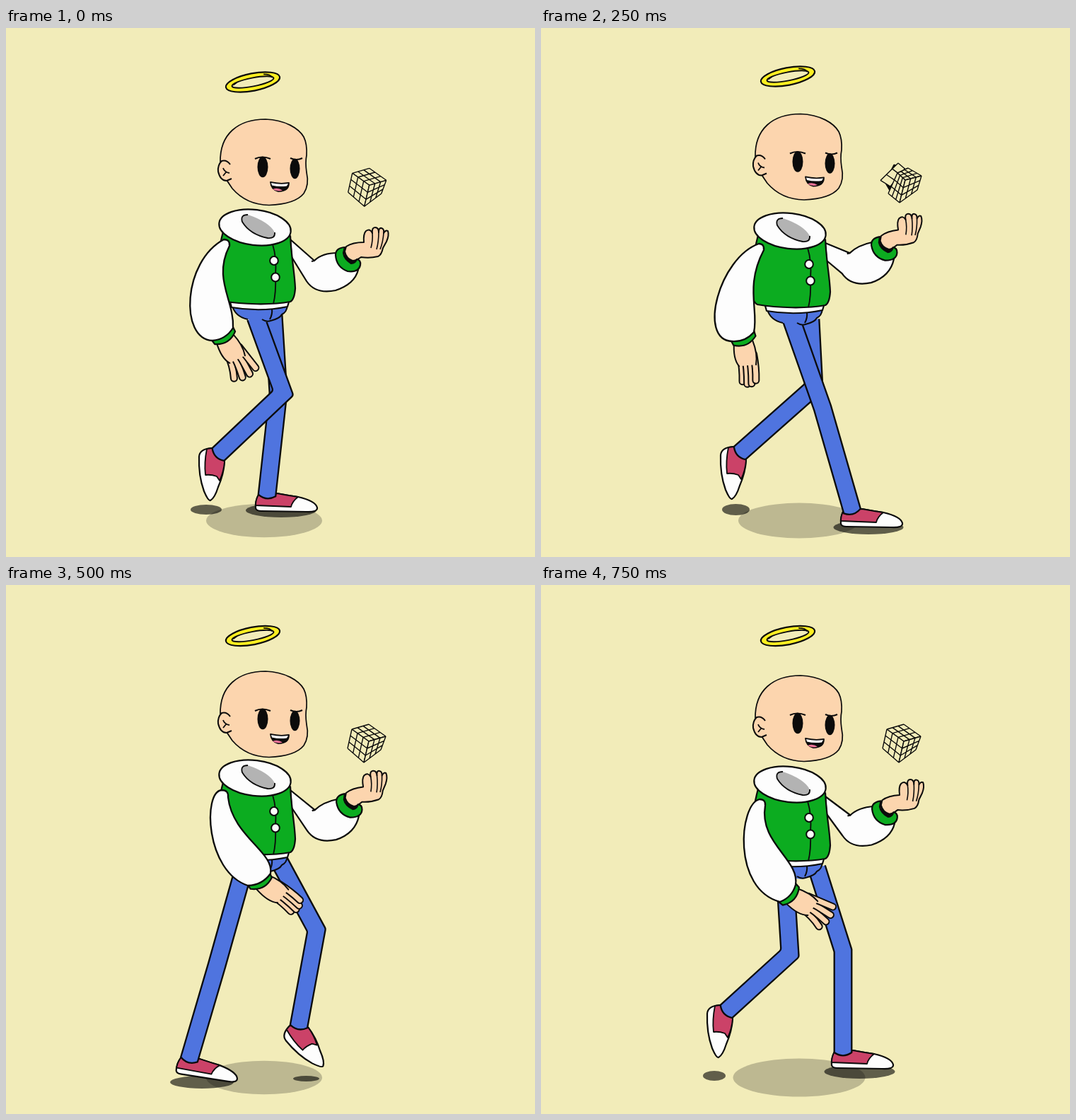
These frames come from a looping animation (748x748 px, 0.83 s). An HTML page with a canvas:

```html
<!DOCTYPE html>
<html lang="en">
<head>
<meta charset="utf-8">
<title>Walk cycle</title>
<style>
html, body { margin: 0; height: 100%; overflow: hidden; background: #f2ecb9; }
canvas { display: block; }
</style>
</head>
<body>
<canvas width="748" height="748"></canvas>
<script>
const c = document.querySelector('canvas').getContext('2d');
const INK = '#0b0b0b', SKIN = '#fcd5ae', GREEN = '#0cac20', BLUE = '#4f74df',
  RED = '#cb4268', WHITE = '#fdfdfd', YELLOW = '#fdee21', PAPER = '#f2ecb9';

const LOOP = 830;
const starts = [0, 80, 160, 250, 330, 410, 500, 580, 660, 750];
// Ten steps over seven key poses. The second half of the walk mirrors the first,
// so steps 1, 4 and 7 reuse a pose with the legs swapped; the near arm is blended.
const poseAt = [0, 4, 1, 2, 6, 3, 4, 1, 5, 6];
const armAt = [0, .5, 1, 2, 2.5, 3, 4, 4.5, 5, 6];

// Heights of halo, head, body; far hand x, y, turn
const body = [
  [0, 0, 0, 0, 0, 0], [-8, -10, -9, 2.5, -20, -9], [-8, -7.5, 5, 1, -15.5, -6],
  [.5, -1, 1, 0, 0, 0], [-4.5, -7, -9, 1, -15.5, -6], [-7.5, -8, 0, 2.5, -14, -7.5],
  [-4.5, -1, 0, 2, -5, -3]
];
// Hip, knee, ankle of the near leg, then of the far leg
const legs = [
  [353, 409, 392, 516, 300, 603, 378, 405, 385, 516, 369, 661],
  [349, 399, 398, 528, 452, 666, 376, 400, 379, 510, 284, 632],
  [354, 412, 398, 537, 440, 683, 381, 412, 386, 508, 281, 601],
  [346, 422, 350, 538, 335, 681, 389, 400, 429, 498, 350, 603],
  [335, 406, 298, 538, 259, 671, 386, 390, 439, 488, 414, 624],
  [346, 425, 350, 524, 246, 619, 388, 400, 447, 542, 477, 661],
  [346, 425, 352, 521, 262, 603, 390, 400, 427, 517, 427, 661]
];
// Shoe kind and turn: near, far
const feet = [
  ['lift', 0, 'flat', 0], ['strike', 0, 'lift', -36], ['flat', 0, 'lift', 0],
  ['flat', 0, 'lift', 0], ['flat', 8, 'lift', -41], ['lift', 0, 'flat', 0],
  ['lift', 0, 'flat', 0]
];
// Ground shadow width; near x, y, rx, ry; far x, y, rx, ry
const shadows = [
  [82, 283, 681, 22, 7, 389, 682, 50, 10], [75, 461, 709, 31, 7, 288, 681, 30, 10],
  [86, 463, 706, 49.5, 10, 275.5, 681, 19.5, 8], [90, 357, 705, 48, 8, 345, 690, 0, 0],
  [82, 277, 703, 45, 9, 424.5, 698, 18.5, 4], [87, 237, 694, 22, 8, 501, 692, 46, 8],
  [93.5, 245, 694, 16, 7, 450.5, 688, 50, 10]
];
// Near sleeve: outer curve from shoulder to wrist, inner curve back up
const sleeves = [
  [308, 299, 250, 330, 245, 440, 292, 442, 321, 424, 323, 385, 292, 355, 316, 308],
  [308, 290, 250, 310, 218, 425, 266, 427, 298, 414, 305, 390, 290, 350, 316, 300],
  [308, 305, 252, 325, 221, 441, 270, 443, 301, 430, 308, 400, 288, 365, 315, 314],
  [305, 295, 276, 300, 285, 405, 335, 433, 366, 417, 376, 385, 322, 366, 316, 305],
  [305, 290, 278, 292, 282, 405, 342, 425, 374, 408, 380, 378, 320, 355, 314, 300],
  [308, 307, 281, 312, 275, 420, 358, 438, 376, 408, 374, 380, 318, 372, 318, 316],
  [309, 303, 280, 310, 270, 430, 338, 448, 360, 424, 366, 388, 308, 365, 317, 312]
];
// Near hand: turn, finger spread
const hands = [[-26, 1], [-9, 0], [-5, 0], [-22, 0], [-51, .1], [-64, .5], [-55, 1]];

const blend = (track, u) => {
  const a = track[Math.floor(u)], b = track[Math.ceil(u)];
  return a.map((v, i) => v + (b[i] - v) * (u % 1));
};

function paint(d, fill, line = 2.2) {
  const path = new Path2D(d);
  if (fill) { c.fillStyle = fill; c.fill(path); }
  if (line) { c.strokeStyle = INK; c.lineWidth = line; c.stroke(path); }
}

function oval(x, y, rx, ry, fill, line = 0, turn = 0) {
  c.beginPath();
  c.ellipse(x, y, rx, ry, turn, 0, 7);
  c.fillStyle = fill;
  c.fill();
  if (line) { c.strokeStyle = INK; c.lineWidth = line; c.stroke(); }
}

function at(x, y, deg, draw) {
  c.save();
  c.translate(x, y);
  c.rotate(deg * Math.PI / 180);
  draw();
  c.restore();
}

const shoes = {
  flat() {
    paint('M-12 -1Q-17 8 -16 18Q-15 22 -8 22L55 23Q72 24 71 17Q69 8 44 2Q30 0 14 -3Z', WHITE);
    paint('M-12 -1Q-16 6 -16 14L34 16Q36 8 44 2Q30 0 14 -3Z', RED, 1.8);
  },
  lift() {
    paint('M-9 -9Q-26 -8 -27 3Q-28 30 -20 52Q-14 66 -11 65Q-5 62 0 46Q8 28 9 10Z', WHITE);
    paint('M-9 -9L-16 -8Q-20 12 -18 29Q-10 28 -2 31L2 37Q8 24 9 10Z', RED, 1.8);
  },
  strike() {
    paint('M-9 2Q-9 24 -2 36L18 14 29 -11Q18 -14 12 -6Z', RED);
    paint('M29 -10Q45 -19 61 -21Q66 -15 56 6Q38 31 13 38Q0 39 -3 33Q10 24 16 14Q23 -2 29 -10Z', WHITE);
    paint('M9 26L26 31M18 14L38 22M24 3L49 11M32 -8L58 -3', 0, 1.8);
  }
};

function leg([hx, hy, kx, ky, ax, ay], kind, turn) {
  at(ax, ay, turn, shoes[kind]);
  const w = 12.3;
  const normal = (x, y) => { const l = Math.hypot(x, y); return [-y / l * w, x / l * w]; };
  const [px, py] = normal(kx - hx, ky - hy), [qx, qy] = normal(ax - kx, ay - ky);
  const m = w * w / (w * w + px * qx + py * qy);
  const mx = (px + qx) * m, my = (py + qy) * m;
  c.beginPath();
  c.moveTo(hx + px, hy + py);
  c.arcTo(kx + mx, ky + my, ax + qx, ay + qy, 5);
  c.lineTo(ax + qx, ay + qy);
  c.quadraticCurveTo(ax + qy * .7, ay - qx * .7, ax - qx, ay - qy);
  c.arcTo(kx - mx, ky - my, hx - px, hy - py, 5);
  c.lineTo(hx - px, hy - py);
  c.fillStyle = BLUE;
  c.fill();
  c.strokeStyle = INK;
  c.lineWidth = 2.3;
  c.stroke();
}

function drawLegs(pose, swap) {
  const [wide, ...dark] = shadows[pose];
  let near = legs[pose].slice(0, 6), far = legs[pose].slice(6);
  let [nearKind, nearTurn, farKind, farTurn] = feet[pose];
  let dx = 0, dy = 0;
  if (swap) {
    const shift = (pts, s) => pts.map((v, i) => v + s * (i % 2 ? 10 + 2.5 * (i - 1) : -36));
    [near, far] = [shift(far, 1), shift(near, -1)];
    [nearKind, nearTurn, farKind, farTurn] = [farKind, farTurn, nearKind, nearTurn];
    dx = 36; dy = -16;
  }
  oval(365, 696.5, wide, wide * .29, 'rgba(0,0,0,.22)');
  oval(dark[0] + dx, dark[1] + dy, dark[2], dark[3], 'rgba(0,0,0,.6)');
  oval(dark[4] - dx, dark[5] - dy, dark[6], dark[7], 'rgba(0,0,0,.6)');
  leg(far, farKind, farTurn);
  leg(near, nearKind, nearTurn);
}

function drawFarArm(b, x, y, turn) {
  const ex = x * .7, ey = y * .7;
  paint(`M402 ${299 + b}L${436 + ex} ${329 + ey}Q${447 + ex} ${318 + ey} ${469 + x} ${318 + y}
    L${498 + x} ${342 + y}Q${493 + x} ${362 + ey} ${466 + ex} ${371 + ey}
    Q${438 + ex} ${377 + ey} ${425 + ex} ${358 + ey}L404 ${324 + b}Z`, WHITE);
  paint(`M${436 + ex} ${329 + ey}l-4 1`, 0);
  at(485 + x, 320 + y, turn, () => {
    c.translate(-485, -320);
    paint('M479 312Q478 326 486 333L496 331 492 322Z', INK);
    paint(`M481 309Q490 303 506 303Q505 291 509 287Q515 283 518 290Q517 282 522 282Q527 282 527 289
      Q527 282 531 283Q535 284 534 290Q537 285 540 287Q542 293 538 302L533 311Q531 321 526 323
      Q514 326 502 324Q495 329 490 329Q481 326 479 316Z`, SKIN, 2);
    paint('M518 290Q519 300 516 311M527 289Q527 302 524 313M534 290Q533 303 529 313', 0, 1.6);
    paint(`M479 310Q466 311 466 321Q467 338 483 344Q499 346 501 335Q502 328 496 327
      Q494 333 488 333Q478 327 477 318Z`, GREEN);
  });
}

function drawTorso() {
  paint('M320 390Q323 407 342 412L362 415Q374 418 388 407Q397 403 399 388Z', BLUE, 0);
  paint('M320 393Q324 408 342 412M362 412Q368 416 374 414Q387 411 390 405Q397 402 398 392M376 397Q377 405 373 412', 0, 2);
  paint('M316 384L319 395Q360 402 398 394L401 384Z', WHITE);
  paint(`M308 284C300 315 296 345 297 362Q298 382 306 386C335 391 375 392 402 387
    Q408 384 409 368C408 345 404 330 402 294Z`, GREEN);
  paint('M377 306Q383 325 381 350Q382 375 378 390', 0, 1.8);
  oval(379, 329, 5.8, 6, WHITE, 2);
  oval(381, 352.5, 5.8, 6, WHITE, 2);
  oval(352, 282, 51, 25, WHITE, 2.2, .12);
  const hole = 'M342 264Q331 264 334 274Q345 292 370 297Q381 298 380 289';
  paint(hole + 'Q372 274 342 264', '#b3b3b3', 0);
  paint(hole, 0, 1.8);
}

function drawNearArm(s, [turn, spread]) {
  const [ox, oy, ix, iy] = s.slice(6, 10), mx = (ox + ix) / 2, my = (oy + iy) / 2;
  at(mx, my, turn, () => {
    c.lineCap = 'round';
    for (let i = 0; i < 4; i++) {
      const x = i * 6.3 - 6, bend = spread * (i * 5 - 7);
      for (const [color, width] of [[INK, 11], [SKIN, 7]]) {
        c.beginPath();
        c.moveTo(x, 26);
        c.quadraticCurveTo(x + 2 + bend * .3, 46, x + bend, 65 + (i % 3 ? 2 : -2));
        c.strokeStyle = color;
        c.lineWidth = width;
        c.stroke();
      }
    }
    const left = 'M-13 6Q-17 30 -9 41', right = 'M15 41Q19 26 13 6';
    paint(left + 'L15 41Q19 26 13 6Z', SKIN, 0);
    paint(left + right, 0, 2);
    c.lineCap = 'butt';
  });
  at(mx, my, Math.atan2(iy - oy, ix - ox) * 180 / Math.PI, () =>
    paint('M-18 -5L-17 6Q0 18 17 6L18 -5Z', GREEN));
  // The wrist edge bulges away from the elbow
  const bx = mx - (iy - oy) * .25, by = my + (ix - ox) * .25;
  paint(`M${s.slice(0, 2)}C${s.slice(2, 8)}Q${bx} ${by} ${ix} ${iy}
    C${s.slice(10, 16)}Q${s[14] + 1} ${s[1]} ${s[0]} ${s[1]}Z`, WHITE, 2.3);
}

function drawHead() {
  paint(`M303 190C302 150 328 129 367 129C395 130 414 142 421 154Q426 164 425 180Q423 190 425 204
    Q429 222 421 234Q409 249 372 250.5Q340 250 320 227Q306 208 303 190Z`, SKIN, 1.7);
  paint('M317 193Q312 186 305 188Q299 194 300 203Q303 216 312 216L319 213', SKIN, 2);
  paint('M307 198Q309 204 316 205M311 204L307 209', 0, 1.8);
  oval(363, 196.5, 7.5, 14.8, INK);
  oval(408.5, 199, 7, 14.3, INK);
  paint('M352 185Q362 180 374 185M402 184Q411 188 419 184', 0, 2.2);
  paint('M374 218Q387 221 400 219Q400 231 385 231Q375 229 374 218Z', INK, 1.8);
  paint('M375 219Q387 222 399 220L397 223.5Q386 225 376 222.5Z', WHITE, 0);
  paint('M377 228Q384 225 391 229.5Q384 232 377 228Z', '#ee7398', 0);
}

function drawHalo() {
  at(349, 76.5, -11, () => {
    oval(0, 0, 38.8, 12.3, YELLOW, 2.2);
    oval(0, 0, 30, 6, PAPER, 2);
    paint('M17 -8Q27 -6 28 -1M-28 -1L-22 -4', 0, 1.6);
  });
}

// Quad split into n by m cells
function grid([ax, ay, bx, by, dx, dy, ex, ey], n = 3, m = 3, line = 1.4) {
  const side = (x1, y1, x2, y2, t) => `${x1 + (x2 - x1) * t} ${y1 + (y2 - y1) * t}`;
  let d = '';
  for (let i = 0; i <= n; i++) d += `M${side(ax, ay, bx, by, i / n)}L${side(ex, ey, dx, dy, i / n)}`;
  for (let i = 0; i <= m; i++) d += `M${side(ax, ay, ex, ey, i / m)}L${side(bx, by, dx, dy, i / m)}`;
  paint(`M${ax} ${ay}L${bx} ${by} ${dx} ${dy} ${ex} ${ey}Z`, PAPER, 0);
  paint(d, 0, line);
}

function drawCube(step) {
  c.save();
  if (step > 0 && step < 4) {
    if (step > 2) c.translate(0, 2);
    paint('M499 191L515 197 504 208 493 228 486 216Z', INK, 1);
    const s = (step - 2) * 6;
    grid([499 + s, 189, 512 + s * .4, 197, 494, 222, 480, 217 - s * .6], 1, 3);
    grid([504, 203, 519, 196, 538, 207, 515, 213]);
    grid([504, 203, 515, 213, 507, 245, 491, 232]);
    grid([515, 213, 538, 207, 532, 227, 507, 245]);
  } else {
    if (!step) c.translate(.7, 1.3);
    grid([489, 204, 513, 197, 537, 214, 513, 221]);
    grid([489, 204, 513, 221, 506, 251, 483, 231]);
    grid([513, 221, 537, 214, 530, 233, 506, 251]);
  }
  c.restore();
}

function frame() {
  const t = performance.now() % LOOP;
  const step = starts.filter(s => s <= t).length - 1;
  const pose = poseAt[step], [halo, head, torso, ...hand] = body[pose];
  c.fillStyle = PAPER;
  c.fillRect(0, 0, 748, 748);
  c.lineJoin = 'round';
  drawLegs(pose, step % 3 === 1);
  drawFarArm(torso, ...hand);
  at(0, torso, 0, drawTorso);
  drawNearArm(blend(sleeves, armAt[step]), blend(hands, armAt[step]));
  at(0, head, 0, drawHead);
  at(0, halo, 0, drawHalo);
  drawCube(step);
  requestAnimationFrame(frame);
}
frame();
</script>
</body>
</html>
```
